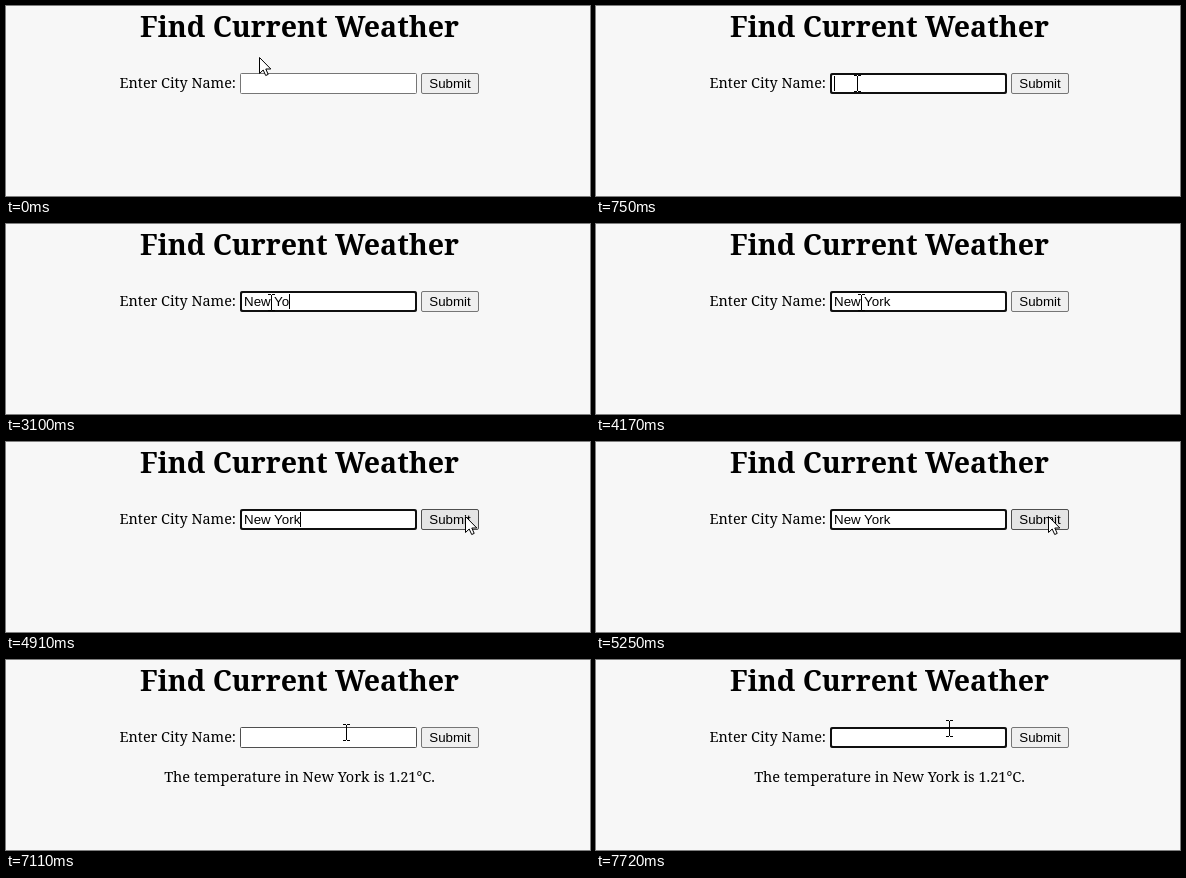
These frames come from a looping animation (584x190 px, 8000 ms). An HTML page:

```html
<!DOCTYPE html>
<html lang="en">
<head>
<meta charset="utf-8">
<title>Find Current Weather</title>
<style>
  html, body { margin: 0; width: 100%; height: 100%; overflow: hidden; background: #f7f7f7; }
  svg { display: block; width: 584px; height: 190px; }
  text { fill: #000; white-space: pre; }
  .serif { font-family: "Noto Serif", serif; font-size: 14.4px; }
  .title { font-size: 28.55px; font-weight: 700; }
  .result { font-size: 14.55px; }
  .sans { font-family: "Liberation Sans", Arial, sans-serif; font-size: 13.333px; }
</style>
</head>
<body>
<svg viewBox="0 0 584 190" xmlns="http://www.w3.org/2000/svg">
  <rect width="584" height="190" fill="#f7f7f7"/>
  <text class="serif title" x="293.5" y="31" text-anchor="middle">Find Current Weather</text>
  <text class="serif" x="230" y="82" text-anchor="end">Enter City Name:</text>

  <rect id="field" x="234.5" y="67.5" width="176" height="20" rx="1" fill="#fff" stroke="#767676"/>
  <rect id="ring" x="235" y="68" width="175" height="19" rx="2" fill="none" stroke="#101010" stroke-width="2"/>
  <text id="city" class="sans" x="238" y="82"></text>
  <rect id="caret" y="70" width="1" height="15"/>

  <rect id="button" x="415.5" y="67.5" width="57" height="20" rx="1.5"/>
  <text class="sans" x="444" y="82" text-anchor="middle">Submit</text>
  <text id="result" class="serif result" x="293.5" y="122" text-anchor="middle">The temperature in New York is 1.21°C.</text>

  <path id="arrow" d="M.5 .5V16.5L4.2 13L6.7 18.5L9.2 17.4L6.8 12H11.8Z" fill="#fff" stroke="#000"/>
  <path id="beam" d="M-3 -7.5H0M1 -7.5H4M.5 -7V8M-3 8.5H0M1 8.5H4" fill="none" stroke="#000"/>
</svg>
<script>
const LOOP = 8000, STEP = 67;
const CITY = "New York";
const keyTimes = [1620, 1890, 2030, 2430, 2760, 3100, 3360, 3640];
const SUBMIT = 5520;

// pointer hot spot: [ms, x, y]
const route = [
  [0, 253, 51], [270, 261, 77], [750, 261, 77], [820, 265, 78],
  [4380, 265, 78], [4500, 340, 82], [4640, 518, 86], [4780, 481, 78],
  [4910, 459, 74], [5180, 452, 74], [6400, 452, 74],
  [7110, 340, 72], [7180, 338, 71], [7520, 338, 71], [7720, 353, 68]
];
const el = Object.fromEntries([...document.querySelectorAll("[id]")].map(e => [e.id, e]));

const show = (e, on) => e.setAttribute("visibility", on ? "visible" : "hidden");
const within = (t, a, b) => t >= a && t < b;
const inBox = (p, x0, x1) => p.x >= x0 && p.x < x1 && p.y >= 67 && p.y < 88;

function pointer(t) {
  const i = route.findIndex(k => k[0] > t);
  if (i < 0) {
    const [, x, y] = route[route.length - 1];
    return { x, y };
  }
  const [t0, x0, y0] = route[i - 1], [t1, x1, y1] = route[i];
  const u = (t - t0) / (t1 - t0);
  return { x: Math.round(x0 + (x1 - x0) * u), y: Math.round(y0 + (y1 - y0) * u) };
}

// The pointer is sampled in even steps, landing exactly on each stop.
function sampled(t) {
  const start = route.filter(k => k[0] <= t).pop()[0];
  return pointer(start + Math.floor((t - start) / STEP) * STEP);
}

function caretOn(t) {
  return within(t, 610, 1150) || within(t, 1620, 4170) ||
         within(t, 4700, 5230) || within(t, 7180, 7720);
}

function draw(t) {
  const p = sampled(t);
  const overField = inBox(p, 234, 411);
  const overButton = inBox(p, 415, 473) && !within(t, SUBMIT, 5850);
  const focused = within(t, 610, SUBMIT) || t >= 7180;
  const typed = t < SUBMIT ? keyTimes.filter(k => k <= t).length : 0;

  el.city.textContent = CITY.slice(0, typed);
  el.field.setAttribute("stroke", overField ? "#4f4f4f" : "#767676");
  el.button.setAttribute("stroke", overButton ? "#4f4f4f" : "#767676");
  el.button.setAttribute("fill", overButton ? "#e5e5e5" : "#efefef");
  el.caret.setAttribute("x", Math.floor(238 + (typed ? el.city.getComputedTextLength() : 0)));
  show(el.ring, focused);
  show(el.caret, caretOn(t));
  show(el.result, t >= SUBMIT);

  show(el.arrow, !overField);
  show(el.beam, overField);
  for (const e of [el.arrow, el.beam]) e.setAttribute("transform", `translate(${p.x} ${p.y})`);
}

const begin = performance.now();
function tick() {
  draw((performance.now() - begin) % LOOP);
  requestAnimationFrame(tick);
}
tick();
</script>
</body>
</html>
```
